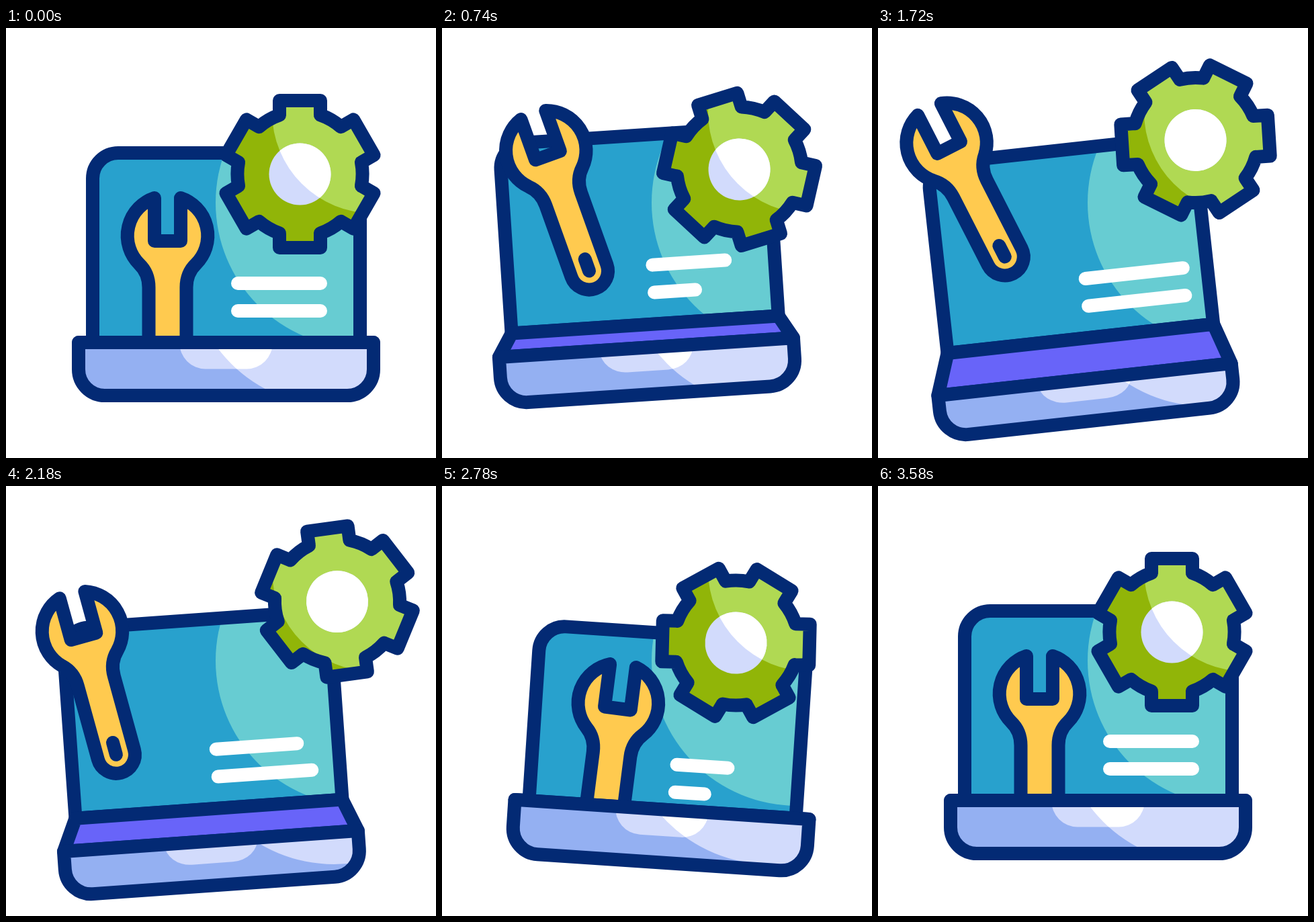
An HTML page with a canvas for the animation above (3600 ms loop, 640 by 640 pixels).

```html
<!DOCTYPE html>
<html lang="en">
<head>
<meta charset="utf-8">
<title>Laptop repair</title>
<style>
html, body { margin: 0; width: 100%; height: 100%; overflow: hidden; background: #fff; }
canvas { display: block; }
</style>
</head>
<body>
<canvas id="stage" width="640" height="640"></canvas>
<script>
const ctx = document.getElementById('stage').getContext('2d');
const LOOP = 3600, LINE_LAG = 130, WIND_UP = .17;
const NAVY = '#032a74', PALE = '#d2dbfc', WHITE = '#fff';

// Every part leaves home, pops out, rises, floats, turns back, dips and comes home.
const beats = [570, 740, 1180, 1720, 2180, 2780, 3440];
const [, , , FLOAT, TURN_BACK] = beats;
const motion = (home, pop, rise, float, back, dip) => t => {
  const u = Math.min(1, Math.max(0, (t - FLOAT) / (TURN_BACK - FLOAT)));
  return curve(t, beats, [home, pop, rise, float, back, dip, home])
    + WIND_UP * (float - home) * Math.sin(Math.PI * u) ** 2;
};

const laptop = {
  x: motion(328, 304.4, 305, 308, 305.4, 328),
  y: motion(468, 475.5, 511, 523, 528.5, 481.5),
  turn: motion(0, -3.75, -5.6, -6.25, -4.05, 3.8),
  lift: motion(0, 34, 55, 61, 48, -20)
};
const wrench = {
  x: motion(240.5, 136, 100, 76.5, 98.5, 269.5),
  y: motion(253, 129.5, 122.5, 121, 162, 267.5),
  turn: motion(0, -19.7, -24.4, -27.1, -15.4, 7.3)
};
const gear = {
  x: motion(437.5, 442.5, 462.5, 472.5, 493, 437.5),
  y: motion(217.5, 210.5, 173, 167, 172, 233.5),
  turn: motion(0, 42.7, 78.8, 86.4, 52.4, -28.6)
};
const lineLength = t => curve(t,
  [120, 480, 740, 1180, 1720, 2050, 2180, 2520, 2780, 3300],
  [123, 20, 108, 135, 146, 140, 121, 20, 76, 123]);

// Monotone cubic through the keys: flat at extremes, smooth elsewhere.
function curve(t, ts, vs) {
  const last = ts.length - 1;
  if (t <= ts[0]) return vs[0];
  if (t >= ts[last]) return vs[last];
  const rate = i => (vs[i + 1] - vs[i]) / (ts[i + 1] - ts[i]);
  const slope = i => {
    if (i === 0 || i === last) return 0;
    const a = rate(i - 1), b = rate(i);
    return a * b > 0 ? 2 * a * b / (a + b) : 0;
  };
  const i = ts.findIndex(k => k > t) - 1;
  const span = ts[i + 1] - ts[i], u = (t - ts[i]) / span;
  return vs[i] + (vs[i + 1] - vs[i]) * u * u * (3 - 2 * u)
    + span * u * (1 - u) * (slope(i) * (1 - u) - slope(i + 1) * u);
}

// Shapes are relative to the hinge, the prong tips and the gear centre.
const screenShape = new Path2D('M-199 0V-244A38 38 0 0 1 -161 -282H161A38 38 0 0 1 199 -244V0Z');
const wrenchShape = new Path2D(
  'M-19.5 0A59.3 59.3 0 0 0 -42.5 98C-33 107 -28 119 -28 133V246.5a28 28 0 0 0 56 0V133' +
  'C28 119 33 107 42.5 98A59.3 59.3 0 0 0 19.5 0V64H-19.5Z');
const gearShape = makeGear();
const hole = new Path2D();
hole.arc(0, 0, 46, 0, 7);

function makeGear() {
  const path = new Path2D(), rad = Math.PI / 180;
  for (let tooth = 0; tooth < 360; tooth += 60) {
    const a = (tooth - 90) * rad;
    const put = (x, y) => path.lineTo(x * Math.cos(a) - y * Math.sin(a), x * Math.sin(a) + y * Math.cos(a));
    put(88, -30.5);
    put(109.5, -30.5);
    put(109.5, 30.5);
    put(88, 30.5);
    path.arc(0, 0, 93.1, a + 19.1 * rad, a + 40.9 * rad);
  }
  path.closePath();
  return path;
}

function place(part, t) {
  ctx.setTransform(1, 0, 0, 1, part.x(t), part.y(t));
  ctx.rotate(part.turn(t) * Math.PI / 180);
}

function fill(path, color) {
  ctx.fillStyle = color;
  ctx.fill(path);
}

function outline(path, color = NAVY) {
  ctx.strokeStyle = color;
  ctx.stroke(path);
}

// The light is a circle fixed to the stage, seen only inside the shape.
function lit(path, color, light, [x, y, r]) {
  fill(path, color);
  ctx.save();
  ctx.clip(path);
  ctx.resetTransform();
  ctx.beginPath();
  ctx.arc(x, y, r, 0, 7);
  ctx.fillStyle = light;
  ctx.fill();
  ctx.restore();
}

function drawScreen(t) {
  place(laptop, t);
  ctx.translate(0, -laptop.lift(t));
  lit(screenShape, '#28a1cd', '#67ccd2', [528, 260, 216]);
  outline(screenShape);
  for (const row of [0, 1]) {
    outline(new Path2D(`M17 ${-88 + row * 41}h${lineLength(t - row * LINE_LAG)}`), WHITE);
  }
}

function drawWrench(t) {
  place(wrench, t);
  fill(wrenchShape, '#ffca4f');
  outline(wrenchShape);
  outline(new Path2D('M0 228V246.5'));
}

function drawBase(t) {
  place(laptop, t);
  const depth = Math.max(0, laptop.lift(t));
  const height = 79 - .27 * depth, padHeight = height / 2;
  const light = [488, 347, 216];
  const deck = new Path2D(`M-199 ${-depth}H199L219 0H-220Z`);
  const front = new Path2D(`M-220 0H219v${height - 39}a39 39 0 0 1 -39 39H-181a39 39 0 0 1 -39 -39Z`);
  const pad = new Path2D(
    `M-70 0a39 ${padHeight} 0 0 0 39 ${padHeight}h61a39 ${padHeight} 0 0 0 39 ${-padHeight}Z`);
  fill(deck, '#6864f9');
  outline(deck);
  lit(front, '#94b0f2', PALE, light);
  lit(pad, PALE, WHITE, light);
  outline(front);
}

function drawGear(t) {
  place(gear, t);
  const light = [547, 125, 151];
  lit(gearShape, '#91b508', '#b0d953', light);
  lit(hole, PALE, WHITE, light);
  outline(gearShape);
}

function draw(t) {
  ctx.resetTransform();
  ctx.fillStyle = WHITE;
  ctx.fillRect(0, 0, 640, 640);
  ctx.lineWidth = 20;
  ctx.lineCap = ctx.lineJoin = 'round';
  drawScreen(t);
  drawWrench(t);
  drawBase(t);
  drawGear(t);
}

const start = performance.now();
function tick() {
  draw((performance.now() - start) % LOOP);
  requestAnimationFrame(tick);
}
tick();
</script>
</body>
</html>
```
